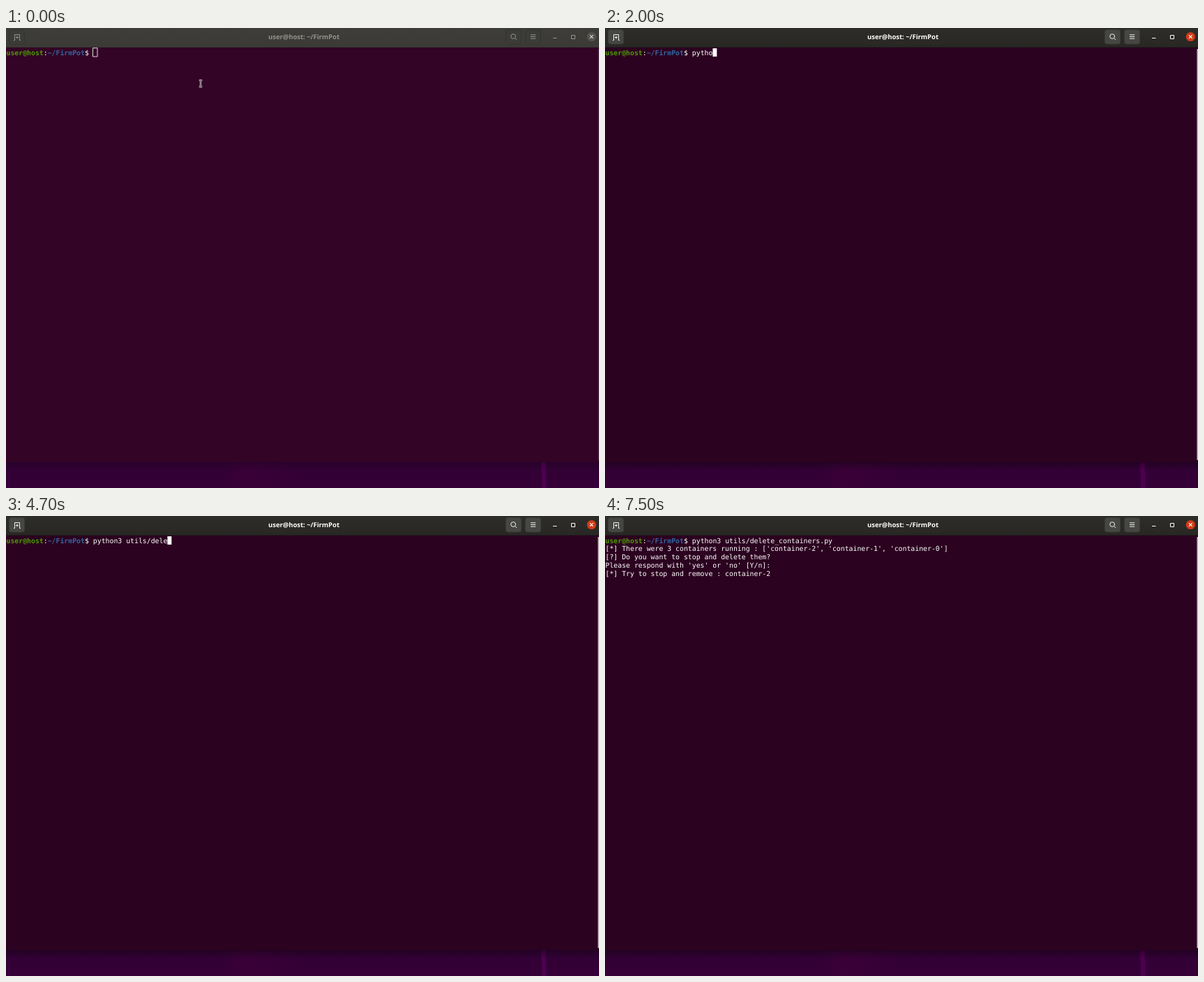
Write an HTML page with a canvas that moves like this. It is 850x659 px and loops after 8000 ms.

```html
<!DOCTYPE html>
<html lang="en">
<head>
<meta charset="utf-8">
<title>Terminal</title>
<style>
  html, body { margin: 0; width: 100%; height: 100%; overflow: hidden; background: #300030; }
  canvas { display: block; }
</style>
</head>
<body>
<canvas id="stage" width="850" height="659"></canvas>
<script>
const ctx = document.getElementById('stage').getContext('2d');
const LOOP = 8000, CELL_W = 5.92, CELL_H = 11.84, LEFT = 0.5, TOP = 29.1;
const MONO = '9.833px "DejaVu Sans Mono", monospace';
const COMMAND = 'python3 utils/delete_containers.py ';
const OUTPUT = [
  "[*] There were 3 containers running : ['container-2', 'container-1', 'container-0']",
  '[?] Do you want to stop and delete them?',
  "Please respond with 'yes' or 'no' [Y/n]: ",
  '[*] Try to stop and remove : container-2'
];
// [time, value]: the last entry reached is in force
const TYPED = [[0, 0], [1500, 1], [1600, 2], [1800, 3], [1900, 4], [2000, 5], [2200, 6], [2300, 7],
  [2800, 9], [3000, 10], [3100, 11], [3300, 14], [4200, 16], [4400, 17], [4700, 18], [4900, 35]];
const PRINTED = [[0, 0], [6300, 3], [7000, 4]];
const CURSOR_ON = [[0, 1], [1000, 0], [1300, 1], [3800, 0], [4000, 1], [5300, 0], [5900, 1],
  [6700, 0], [6900, 1], [7500, 0]];
const BUTTONS = [[0, 0], [400, 0.25], [500, 0.75], [600, 1]];

const at = (steps, t) => steps.filter(s => s[0] <= t).pop()[1];
const grey = (from, to, k) => {
  const v = Math.round(from + (to - from) * k);
  return `rgb(${v},${v},${v - 4})`;
};

function rect(x, y, w, h, fill) {
  ctx.fillStyle = fill;
  ctx.fillRect(x, y, w, h);
}

function fade(y, h, ...colors) {
  const g = ctx.createLinearGradient(0, y, 0, y + h);
  colors.forEach((c, i) => g.addColorStop(i / (colors.length - 1), c));
  return g;
}

function stroke(path, color, width = 1) {
  ctx.strokeStyle = color;
  ctx.lineWidth = width;
  ctx.stroke(new Path2D(path));
}

function write(text, col, row, color = '#fff', weight = '') {
  ctx.font = `${weight} ${MONO}`;
  ctx.fillStyle = color;
  ctx.fillText(text, LEFT + col * CELL_W, TOP + row * CELL_H + 9.4);
}

function drawDesktop(focused) {
  rect(0, 621, 850, 38, fade(621, 38, '#2f0232', '#330036', '#350037'));
  const glow = ctx.createLinearGradient(310, 0, 420, 0);
  glow.addColorStop(0, 'rgba(66,0,58,0)');
  glow.addColorStop(0.3, 'rgba(66,0,58,.4)');
  glow.addColorStop(1, 'rgba(66,0,58,0)');
  rect(310, 622, 110, 37, glow);
  ctx.fillStyle = '#4d0050';
  ctx.fill(new Path2D('M767 621h6.5l1 38h-6z'));
  rect(0, 621, 850, 12, fade(621, 12, `rgba(20,0,20,${focused ? 0.5 : 0.3})`, 'rgba(20,0,20,0)'));
}

function drawButton(x, k, icon) {
  ctx.beginPath();
  ctx.roundRect(x + 0.5, 2.5, 22, 20.5, 3);
  ctx.fillStyle = grey(59, 70, k);
  ctx.fill();
  ctx.strokeStyle = grey(50, 58, k);
  ctx.lineWidth = 1;
  ctx.stroke();
  stroke(icon, grey(148, 242, k));
}

function drawTitleBar(focused, k) {
  rect(0, 0, 850, 28, focused ? fade(0, 28, '#2e2d2a', '#282724') : fade(0, 28, '#3e3d39', '#3b3a36'));
  rect(0, 27, 850, 1, focused ? '#201e1c' : '#34322f');
  const ink = focused ? '#fff' : '#94928d';
  ctx.font = 'bold 9.45px "Noto Sans", sans-serif';
  ctx.textAlign = 'center';
  ctx.fillStyle = ink;
  ctx.fillText('user@host: ~/FirmPot', 427, 16);
  ctx.textAlign = 'left';

  drawButton(4, k, 'M11 17.5h1.5v-8h7v8h1.5M16 11.5v4M14 13.5h4');
  drawButton(716, k, 'M730.5 12a3.4 3.4 0 1 1-6.8 0a3.4 3.4 0 1 1 6.8 0M729.6 14.5l2.6 2.6');
  drawButton(744, k, 'M752 9.8h7.2M752 12.5h7.2M752 15.2h7.2');
  stroke('M784 14.5h5.5M810.5 10.5h5v5h-5z', ink);

  ctx.beginPath();
  ctx.arc(839.3, 12.5, 6.6, 0, 7);
  ctx.fillStyle = focused ? '#d23c17' : '#54534e';
  ctx.fill();
  stroke('M837 10.2l4.6 4.6M841.6 10.2l-4.6 4.6', focused ? '#fff' : '#dcdad5', 1.1);
}

function drawCursor(t, focused, typed) {
  if (!at(CURSOR_ON, t)) return;
  let row = 0, col = 21 + typed;
  if (t >= 7000) [row, col] = [5, 0];
  else if (t >= 6300) [row, col] = [3, OUTPUT[2].length];
  else if (t >= 6000) [row, col] = [1, 0];
  const x = LEFT + col * CELL_W, y = TOP + row * CELL_H;
  if (focused) rect(x, y, CELL_W, CELL_H, '#fff');
  else stroke('M124.5 28.7h6.5v12.3h-6.5z', '#e4dde2');
}

function drawPointer() {
  const beam = 'M276.8 75h1.4l.8.7l.8-.7h1.4M279 75.5v8M276.8 84h1.4l.8-.7l.8.7h1.4';
  stroke(beam, '#e8e0e5', 2.4);
  stroke(beam, '#1c1018', 0.9);
}

function draw(t) {
  const focused = t >= 400, typed = at(TYPED, t);
  drawDesktop(focused);
  rect(0, 28, 850, 594, focused ? '#2b021f' : '#330425');
  rect(848.5, 30, 1.5, 589, focused ? '#cdbfca' : '#4a2440');
  drawTitleBar(focused, at(BUTTONS, t));

  write('user@host', 0, 0, '#4e9a06', 'bold');
  write(':', 9, 0);
  write('~/FirmPot', 10, 0, '#3465a4', 'bold');
  write('$ ' + COMMAND.slice(0, typed), 19, 0);
  OUTPUT.slice(0, at(PRINTED, t)).forEach((line, i) => write(line, 0, i + 1));
  drawCursor(t, focused, typed);
  if (t < 1300) drawPointer();
}

ctx.textRendering = 'geometricPrecision';
const start = performance.now();
function tick() {
  draw((performance.now() - start) % LOOP);
  requestAnimationFrame(tick);
}
tick();
</script>
</body>
</html>
```
